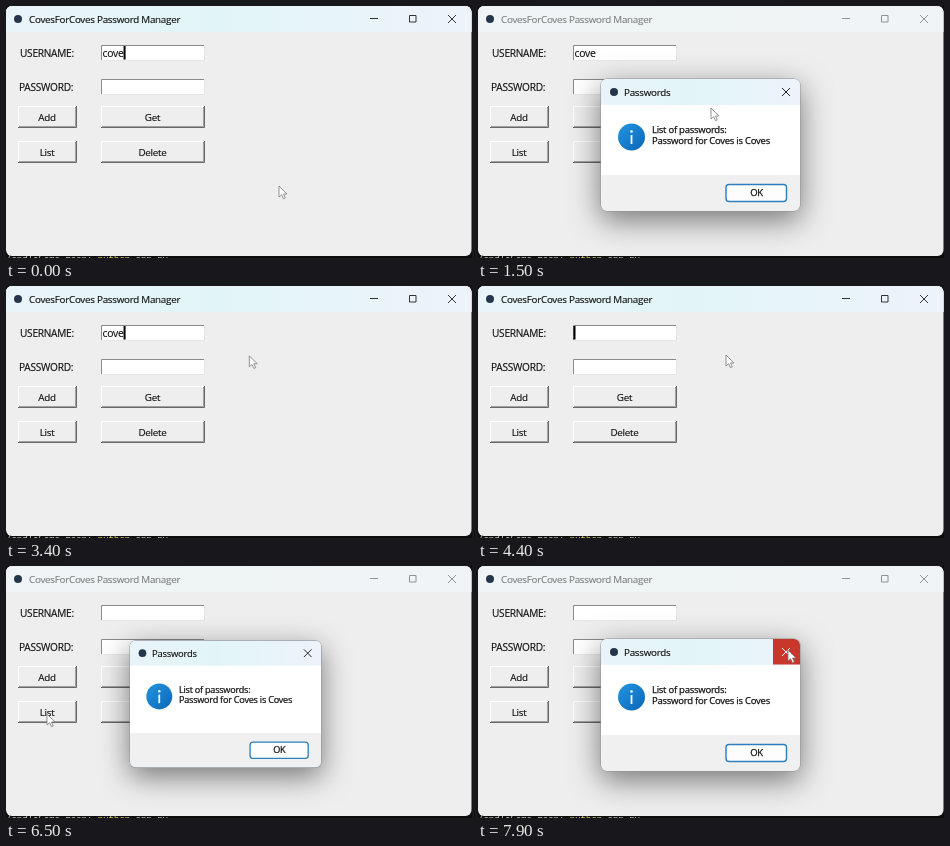
Write an HTML page that moves like this. It is 466x252 px and loops after 8 s.

```html
<!DOCTYPE html>
<html lang="en">
<head>
<meta charset="utf-8">
<title>Password Manager</title>
<style>
  html, body { margin: 0; width: 100%; height: 100%; overflow: hidden; background: #0c0c0c; }
  svg { display: block; width: 466px; height: 252px; font: 9.8px "Open Sans", "Noto Sans", sans-serif; letter-spacing: -.25px; }
  text { white-space: pre; fill: #111; stroke: #111; stroke-width: .15px; }
  .mid { text-anchor: middle; }
  .label { font-size: 10.1px; }
  .msg { font-size: 9.5px; stroke-width: .25px; }
  .term { font: 9px "Noto Sans Mono", monospace; letter-spacing: 0; fill: #ccc; stroke: none; }
  .icon { fill: none; stroke: #333; }
  #dialog { filter: drop-shadow(0 9px 15px rgba(0, 0, 0, .5)); }
</style>
</head>
<body>
<svg viewBox="0 0 466 252">
  <defs>
    <linearGradient id="bar">
      <stop offset="0" stop-color="#e9f4fa"/>
      <stop offset=".45" stop-color="#e2f5f6"/>
      <stop offset="1" stop-color="#edf3fb"/>
    </linearGradient>
    <linearGradient id="info" x2="1" y2="1">
      <stop offset="0" stop-color="#2296e0"/>
      <stop offset="1" stop-color="#0b66b8"/>
    </linearGradient>
    <clipPath id="frame"><rect width="465.500" height="250" rx="6"/></clipPath>
    <clipPath id="box"><rect x="123" y="73" width="199" height="132" rx="6"/></clipPath>
  </defs>

  <text class="term" x="0" y="256">/andleGame-mean: <tspan fill="#d8d060">python</tspan> app.py</text>

  <g clip-path="url(#frame)">
    <rect width="466" height="252" fill="#eee"/>
    <rect width="466" height="26" fill="#f2f4f5"/>
    <rect id="active" width="466" height="26" fill="url(#bar)"/>
    <circle cx="12" cy="13" r="4" fill="#26364a"/>
    <g id="caption">
      <text x="23" y="16.500">CovesForCoves Password Manager</text>
      <path class="icon" d="M364 12.500h8M403.500 9.500h6.500v6.500h-6.500zM442 9l8 8m0-8l-8 8"/>
    </g>
    <text class="label" x="14" y="50.500">USERNAME:</text>
    <text class="label" x="13" y="84.500">PASSWORD:</text>
    <g id="widgets"></g>
    <text id="name" x="96.500" y="50.500" font-size="10.400"></text>
    <rect id="caret" y="40" width="2" height="13.500" fill="#000"/>
  </g>

  <g id="dialog">
    <rect x="122.500" y="72.500" width="200" height="133" rx="6.500" fill="#8d9499"/>
    <g clip-path="url(#box)">
      <rect x="123" y="73" width="199" height="97" fill="#fff"/>
      <rect x="123" y="73" width="199" height="26" fill="url(#bar)"/>
      <rect x="123" y="169" width="199" height="36" fill="#f0f0f0"/>
      <rect id="hover" x="295" y="73" width="27" height="25.500" fill="#c7382b"/>
    </g>
    <circle cx="136" cy="86" r="4" fill="#26364a"/>
    <text x="146" y="89.500">Passwords</text>
    <path id="cross" class="icon" d="M304 82l8 8m0-8l-8 8"/>
    <circle cx="153.500" cy="131" r="13.500" fill="url(#info)"/>
    <path d="M153.500 129v9" stroke="#fff" stroke-width="1.800"/>
    <circle cx="153.500" cy="125.500" r="1.300" fill="#fff"/>
    <text class="msg" x="174" y="127">List of passwords:</text>
    <text class="msg" x="174" y="138">Password for Coves is Coves</text>
    <rect x="248" y="178.500" width="60.500" height="17" rx="3" fill="#fdfdfd" stroke="#2d7fbd" stroke-width="1.400"/>
    <text class="msg mid" x="278.500" y="190.300">OK</text>
  </g>

  <path id="cursor" d="M0 0v11l2.600-2.300 1.900 4 1.800-.8-1.800-3.900h3.400z" fill="#fff" stroke="#777" stroke-width=".8"/>
</svg>
<script>
const LOOP = 8000;
const $ = id => document.getElementById(id);
const clamp = v => Math.max(0, Math.min(1, v));
const between = (t, a, b) => t >= a && t < b;
const show = (id, on) => $(id).setAttribute('visibility', on ? 'visible' : 'hidden');

// Upper-left and lower-right edges of a box, inset by d
const corners = (x, y, w, h, d, light, dark) =>
  `<path d="M${x + d + .5} ${y + h - d}V${y + d + .5}H${x + w - d}" fill="none" stroke="${light}"/>
   <path d="M${x + d} ${y + h - d - .5}H${x + w - d - .5}V${y + d}" fill="none" stroke="${dark}"/>`;
const face = (x, y, w, h, fill) => `<rect x="${x}" y="${y}" width="${w}" height="${h}" fill="${fill}"/>`;

const entry = y => face(95, y, 104, 16, '#fff') + corners(95, y, 104, 16, 0, '#8a8a8a', '#e6e6e6');
function button(x, y, w, label, pressed) {
  const shift = pressed ? 1 : 0;
  const edges = pressed
    ? corners(x, y, w, 22, 0, '#696969', '#fff')
    : corners(x, y, w, 22, 0, '#fff', '#696969') + corners(x, y, w, 22, 1, '#eee', '#a0a0a0');
  return face(x, y, w, 22, '#eee') + edges +
    `<text class="mid" x="${x + w / 2 + shift - .5}" y="${y + 14.6 + shift}">${label}</text>`;
}
function widgets(pressed) {
  return entry(39) + entry(73) + button(12, 100, 59, 'Add') + button(95, 100, 104, 'Get') +
    button(12, 135, 59, 'List', pressed) + button(95, 135, 104, 'Delete');
}

// Pointer stops: time, x, y
const stops = [
  [0, 273, 180], [100, 273, 180], [650, 42, 148], [1000, 42, 148], [1500, 233, 102],
  [2200, 312, 96], [2900, 312, 96], [3000, 311, 87], [3200, 311, 87], [3650, 150, 46],
  [4050, 150, 46], [4400, 248, 69], [4600, 248, 69], [5000, 300, 200], [5450, 200, 140],
  [5700, 50, 122], [6000, 41, 148], [6850, 41, 148], [7600, 310, 84], [LOOP, 310, 84]
];
function pointer(t) {
  const i = Math.max(1, stops.findIndex(s => s[0] > t));
  const [t0, x0, y0] = stops[i - 1], [t1, x1, y1] = stops[i];
  const p = (t - t0) / (t1 - t0), e = p * p * (3 - 2 * p);
  return [x0 + (x1 - x0) * e, y0 + (y1 - y0) * e];
}

// Dialog visits: opening and closing time
const visits = [[900, 3150], [6400, LOOP + 500]];
let wasPressed;

function draw(t) {
  const visit = visits.find(([a, b]) => between(t, a, b + 150));
  let open = 0;
  if (visit) {
    const grow = (1 - clamp((t - visit[0]) / 270)) ** 2;
    const fade = clamp((t - visit[1]) / 150);
    const scale = 1 - .1 * grow - .06 * fade;
    open = clamp((t - visit[0]) / 80) * (1 - fade);
    $('dialog').setAttribute('transform', `translate(148 117) scale(${scale}) translate(-148 -117)`);
  }
  show('dialog', visit);
  $('dialog').style.opacity = open;
  $('active').style.opacity = 1 - open * .8;
  $('caption').style.opacity = 1 - open * .5;

  const pressed = between(t, 750, 880) || between(t, 6230, 6380);
  if (pressed !== wasPressed) $('widgets').innerHTML = widgets(wasPressed = pressed);

  const erased = t < 3900 ? 0 : Math.min(4, Math.floor((t - 3900) / 100) + 1);
  const name = $('name');
  name.textContent = 'cove'.slice(0, 4 - erased);
  $('caret').setAttribute('x', erased < 4 ? 96.5 + name.getComputedTextLength() : 95.5);
  const blink = t < 3150 ? t : t < 4300 ? 0 : t - 4300;
  show('caret', !visit && blink % 900 < 600);

  const hot = between(t, 2950, 3300) || t >= 7450;
  show('hover', visit && hot);
  $('cross').style.stroke = hot ? '#fff' : '#222';
  $('cursor').setAttribute('transform', `translate(${pointer(t)})`);
}

function tick() {
  draw(performance.now() % LOOP);
  requestAnimationFrame(tick);
}
tick();
</script>
</body>
</html>
```
